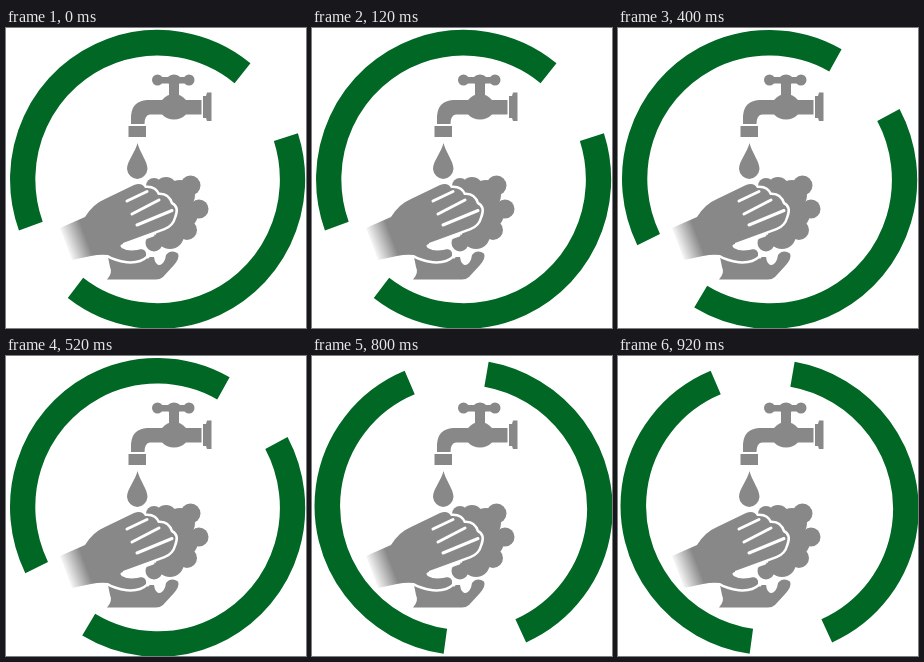
Animation of 300x300 px, one loop 1000 ms. Source, as an HTML page:

```html
<!DOCTYPE html>
<html lang="en">
<head>
<meta charset="utf-8">
<title>Wash your hands</title>
<style>
  html, body { margin: 0; height: 100%; overflow: hidden; background: #fff; }
  svg { display: block; width: 100vw; height: 100vh; }
  .line { fill: none; stroke: #fff; stroke-width: 3; stroke-linecap: round; stroke-linejoin: round; }
</style>
</head>
<body>
<svg viewBox="0 0 300 300">
  <defs>
    <linearGradient id="fade" gradientUnits="userSpaceOnUse" x1="55" y1="207" x2="76" y2="199">
      <stop offset="0" stop-color="#fff"/>
      <stop offset="1" stop-color="#888"/>
    </linearGradient>
  </defs>

  <!-- the ring is slightly oval, so its shape turns with it -->
  <g transform="translate(151.6 151.4)">
    <g id="ring">
      <g transform="scale(.992 1.005)">
        <circle r="136" pathLength="360" transform="rotate(160)" fill="none" stroke="#006725"
          stroke-width="25.5" stroke-dasharray="149 33 145.5 32.5"/>
      </g>
    </g>
  </g>

  <g fill="#888">
    <g id="tap">
      <circle cx="151.500" cy="52" r="5.500"/>
      <circle cx="183" cy="52" r="5.500"/>
      <ellipse cx="168" cy="52" rx="7" ry="5.500"/>
      <path d="M151 49H184V55.500H173V68H163V55.500H151Z"/>
      <path d="M125 96V88Q126 73 141 72H156Q161 66 168 66T180 72H195.500V86.500H180Q175 91.500 168 91.500T156 86.500H144Q138.500 87 138.500 96Z"/>
      <path d="M197 68H200L201 64.500H205.500V93H201L200 90H197Z"/>
      <rect x="122.500" y="98" width="17.500" height="11"/>
    </g>
    <path id="drop" d="M131.500 115C133.500 124 141.500 133 141.500 141A10.300 11 0 0 1 121 141C121 133 129.500 124 131.500 115Z"/>

    <g id="foam">
      <circle cx="148" cy="158" r="8"/>
      <circle cx="160" cy="160" r="11"/>
      <circle cx="184.500" cy="157.500" r="10"/>
      <circle cx="174" cy="167" r="15"/>
      <circle cx="193" cy="181" r="9.500"/>
      <circle cx="178" cy="186" r="14"/>
      <circle cx="181" cy="202" r="10"/>
      <circle cx="164" cy="207" r="14"/>
      <circle cx="148" cy="215" r="8.500"/>
    </g>

    <path id="lower" d="M102 229H148Q149 237 154 237Q159 235 160 227Q165 221 172 225.500Q174 230 168 237L157 249Q154 251.500 150 251.500H101Q107 245 104 239Z"/>
    <path d="M149 225Q155 219 159 222L158 231L153 237Q148 235 149 225Z" fill="#fff"/>

    <path id="upper" fill="url(#fade)" stroke="#fff" stroke-width="5" stroke-linejoin="round" paint-order="stroke"
      d="M54 200L79 189Q87 176 99 171L128 157Q136 154 139 160
         Q149 159 152 167Q162 166 165 176Q172 179 168 189
         Q166 197 158 200L117 215Q116 220 122 222L134 221Q141 221 140 228
         Q134 234 121 233Q109 231 102 227Q94 226 85 228L66 232Z"/>
    <path class="line" d="M121 173L141 163.500M126 186L153 172M131 197L166 182.500M116 218L147 207"/>
    <path class="line" d="M117 219Q124 223 137 219Q144 223 142 229"/>
  </g>
</svg>
<script>
  const ring = document.getElementById("ring");
  const angles = [0, 90, 171.800, 217.800, 298];

  function draw(now) {
    const step = Math.floor(now / 200) % angles.length;
    ring.setAttribute("transform", `rotate(${angles[step]})`);
    requestAnimationFrame(draw);
  }
  draw(performance.now());
</script>
</body>
</html>
```
